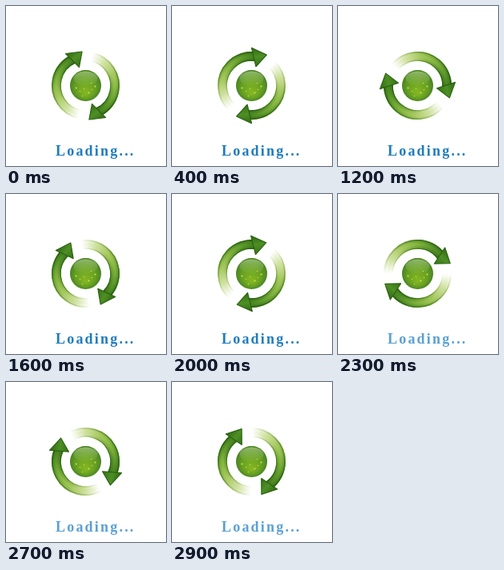
An HTML page with a canvas for the animation above (3 s loop, 200x200 px).

```html
<!DOCTYPE html>
<html lang="en">
<head>
<meta charset="utf-8">
<title>Loading</title>
<style>
  html, body { margin: 0; width: 100%; height: 100%; overflow: hidden; background: #fff; }
  canvas { display: block; width: 200px; height: 200px; }
  p {
    position: absolute; left: 62px; top: 171px; margin: 0;
    font: bold 18px/20px "Liberation Serif", "Times New Roman", serif;
    letter-spacing: 2.2px; white-space: nowrap; color: #1f7cbd;
    animation: blink 200ms steps(1) infinite;
  }
  @keyframes blink { 50% { color: #5aa1d3; } }
</style>
</head>
<body>
<canvas id="stage" width="200" height="200"></canvas>
<p id="label">Loading...</p>
<script>
const ctx = document.getElementById('stage').getContext('2d');
const LOOP = 3000, STEP = 100, C = 99.5;
const TAIL = 102, NECK = 246;
const rad = deg => deg * Math.PI / 180;

// [time in ms, turn in degrees]
const turns = [[0, 0], [600, 48], [800, 69], [1200, 117], [1600, 160],
  [2000, 211], [2500, 290], [2900, 349], [3000, 360]];

function turnAt(t) {
  const i = turns.findIndex(k => k[0] > t);
  const [t0, a0] = turns[i - 1], [t1, a1] = turns[i];
  return a0 + (a1 - a0) * (t - t0) / (t1 - t0);
}

// Gradient along the arc from the faded tail to the neck; it starts early to keep its seam clear of the stroke
function fade(...colors) {
  const g = ctx.createConicGradient(rad(TAIL - 10), 0, 0);
  const span = (NECK - TAIL) / 360;
  colors.forEach((c, i) => g.addColorStop(10 / 360 + span * i / (colors.length - 1), c));
  return g;
}

const band = fade('rgba(214,228,176,0)', 'rgba(190,214,130,.75)', '#9dc25a', '#75a838', '#528f26', '#3d7a1a');
const edge = fade('rgba(150,190,90,0)', 'rgba(130,172,66,.4)', 'rgba(84,134,36,.7)', '#46801f', '#316a14', '#285c10');
const shine = fade('rgba(200,222,130,0)', 'rgba(205,224,140,.3)', 'rgba(176,208,96,.5)', 'rgba(150,194,72,.5)', 'rgba(120,170,56,.4)', 'rgba(90,146,40,.2)');

function arc(r, width, style) {
  ctx.beginPath();
  ctx.arc(0, 0, r, rad(TAIL), rad(NECK));
  ctx.lineWidth = width;
  ctx.strokeStyle = style;
  ctx.stroke();
}

function arrow() {
  arc(36.6, 11.6, band);
  arc(41.6, 1.8, edge);
  arc(31.4, 1.4, edge);
  arc(36.5, 4, shine);

  const g = ctx.createLinearGradient(-22, -42, -8, -24);
  g.addColorStop(0, '#2f6a14');
  g.addColorStop(0.5, '#4e8f24');
  g.addColorStop(1, '#377418');
  ctx.beginPath();
  ctx.moveTo(-4.4, -42.5);
  ctx.lineTo(-25, -40);
  ctx.lineTo(-8, -23);
  ctx.closePath();
  ctx.fillStyle = g;
  ctx.fill();
  ctx.lineWidth = 1.2;
  ctx.lineJoin = 'round';
  ctx.strokeStyle = '#2c6313';
  ctx.stroke();
}

function ball() {
  const g = ctx.createRadialGradient(0, 9, 2, 0, 0, 19.6);
  g.addColorStop(0, '#82b522');
  g.addColorStop(0.6, '#669f22');
  g.addColorStop(0.9, '#518b25');
  g.addColorStop(1, '#487f22');
  ctx.beginPath();
  ctx.arc(0, 0, 19.5, 0, 7);
  ctx.fillStyle = g;
  ctx.fill();

  const gloss = ctx.createLinearGradient(0, -18, 0, 0);
  gloss.addColorStop(0, 'rgba(200,222,170,.55)');
  gloss.addColorStop(1, 'rgba(150,195,100,.08)');
  ctx.beginPath();
  ctx.ellipse(0, -9, 15, 9, 0, 0, 7);
  ctx.fillStyle = gloss;
  ctx.fill();

  ctx.fillStyle = '#c3e34f';
  [[-12, 3], [-7, 7], [-2, 4], [4, 9], [8, 5], [-4, 13], [12, 1], [7, -3]].forEach(([x, y], i) => {
    ctx.beginPath();
    ctx.arc(x, y, i % 3 ? 0.7 : 1.1, 0, 7);
    ctx.fill();
  });
}

function draw(ms) {
  const t = Math.floor(ms % LOOP / STEP) * STEP;
  ctx.clearRect(0, 0, 200, 200);
  ctx.save();
  ctx.translate(C, C);
  ball();
  ctx.rotate(rad(turnAt(t)));
  arrow();
  ctx.rotate(Math.PI);
  arrow();
  ctx.restore();
}

const blink = document.getElementById('label').getAnimations()[0];
let start;
function tick(now) {
  if (start === undefined) {
    start = now;
    if (blink) blink.startTime = now;
  }
  draw(now - start);
  requestAnimationFrame(tick);
}
draw(0);
requestAnimationFrame(tick);
</script>
</body>
</html>
```
